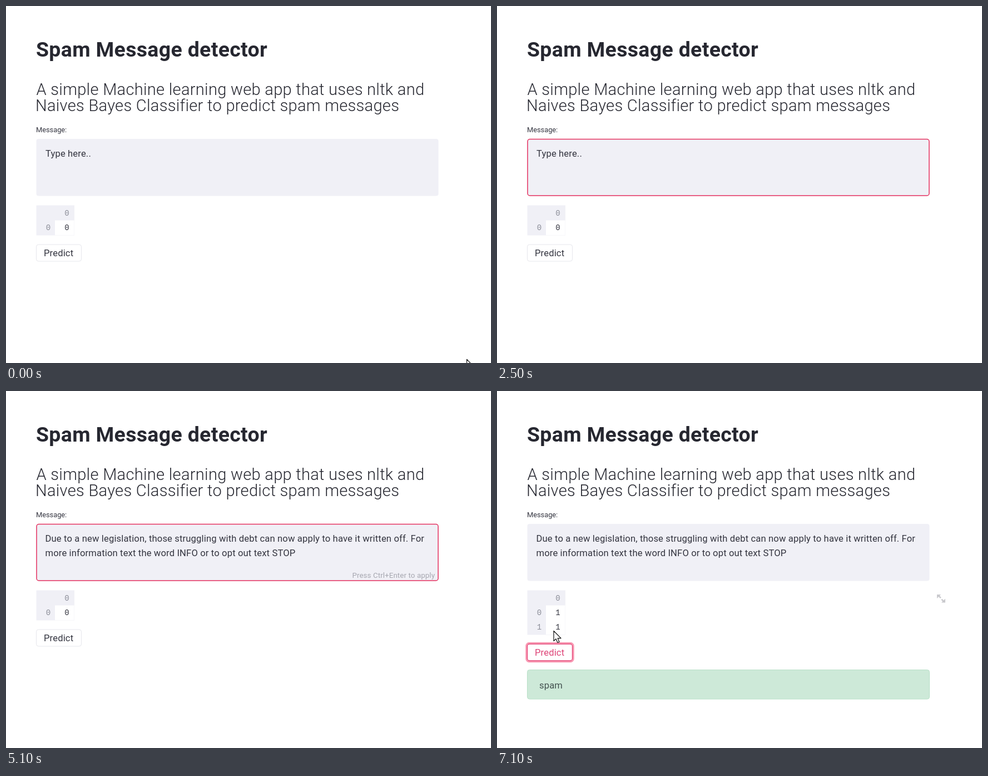
An HTML page for the animation above (7200 ms loop, 872x642 px).

```html
<!DOCTYPE html>
<html lang="en">
<head>
<meta charset="utf-8">
<title>Spam Message detector</title>
<style>
  html, body { margin: 0; width: 100%; height: 100%; overflow: hidden; background: #fff; }
  svg { display: block; width: 872px; height: 642px; }
  text { font: 16.57px Roboto, sans-serif; letter-spacing: .0093em; fill: #33343f; white-space: pre; }
  .title { font-size: 37.4px; font-weight: 700; fill: #262730; }
  .intro { font-size: 29px; font-weight: 300; letter-spacing: .011em; fill: #262730; }
  .label { font-size: 12.8px; letter-spacing: 0; }
  .hint { font-size: 13.26px; fill: #a6a7b0; }
  .cell { font: 14px "Liberation Mono", monospace; letter-spacing: 0; text-anchor: middle; }
  .index { fill: #8b8d98; }
  .panel { fill: #f0f0f6; }
  .cursor { fill: #fff; stroke: #111; stroke-width: 1.2; stroke-linejoin: round; }
</style>
</head>
<body>
<svg viewBox="0 0 872 642">
  <defs>
    <clipPath id="selected"><rect id="selectedArea" y="253" height="22"/></clipPath>
  </defs>

  <text class="title" x="54" y="91">Spam Message detector</text>
  <text class="intro" x="54.5" y="160">A simple Machine learning web app that uses nltk and</text>
  <text class="intro" x="53" y="189">Naives Bayes Classifier to predict spam messages</text>
  <text class="label" x="54" y="227">Message:</text>

  <rect class="panel" x="54.5" y="239" width="723" height="102.5" rx="4"/>
  <rect id="focus" x="55" y="239.5" width="722" height="101.5" rx="4" fill="none" stroke="#e5315f" stroke-width="1.5"/>
  <g id="placeholder">
    <text x="71" y="270.5">Type here..</text>
    <rect id="selection" y="253" height="22" fill="#2f8dfb"/>
    <text x="71" y="270.5" clip-path="url(#selected)" style="fill:#fff">Type here..</text>
    <path id="beam" d="M-4 272H-1L0 273L1 272H4M0 273V287" fill="none" stroke="#fff" stroke-width="1.5"/>
  </g>
  <path id="caret" d="M152.5 254V275" stroke="#262730"/>
  <g id="message">
    <text x="70.5" y="270.5">Due to a new legislation, those struggling with debt can now apply to have it written off. For</text>
    <text x="70.5" y="296.5">more information text the word INFO or to opt out text STOP</text>
  </g>
  <text id="hint" class="hint" x="622.5" y="336">Press Ctrl+Enter to apply</text>

  <rect id="tableBack" class="panel" x="54.5" y="358.5" width="68.5"/>
  <rect id="tableBody" x="88" y="385.5" width="34.5" fill="#fff"/>
  <text class="cell index" x="109.5" y="377">0</text>
  <text class="cell index" x="76" y="402.5">0</text>
  <text class="cell" id="firstValue" x="109.5" y="402.5"></text>
  <g id="secondRow">
    <text class="cell index" x="76" y="428.5">1</text>
    <text class="cell" x="109.5" y="428.5">1</text>
  </g>

  <g id="button">
    <rect id="ring" x="52.8" y="427.3" width="84.4" height="33.4" rx="5" fill="none" stroke="#f99ab3" stroke-width="3"/>
    <rect id="buttonEdge" x="54.5" y="429" width="81" height="30" rx="4" fill="#fff"/>
    <text id="buttonText" x="68" y="450">Predict</text>
  </g>

  <g id="result">
    <rect x="54.5" y="501.5" width="723" height="52.5" rx="4" fill="#cde9d8" stroke="#b8e0c8"/>
    <text x="76" y="534.5" style="fill:#43514f">spam</text>
  </g>
  <path id="expand" fill="#c9c9cd" d="M791 366H798L795.8 368.2L798.8 371.2L797 373L794 370L791 373Z
    M806 380.5H799L801.2 378.3L798.4 375.5L800.2 373.7L803 376.5L806 373.5Z"/>

  <path id="arrow" class="cursor" d="M0 0V18L4 14.3L7 21L10 19.7L7.2 13.2H13Z"/>
  <path id="hand" class="cursor" d="M-2 13V2A2 2 0 0 1 2 2V8.5Q4 7.6 6 9.3Q8 8.4 9.5 10.3Q11.3 10 11.3 12V17C11.3 20 9 21 9 24.5H0C0 21-3 19.5-4.5 16L-7 12.6C-8 10.6-5.6 9.5-4.2 11ZM2 8.5V13M6 9.3V13.5M9.5 10.3V14"/>
</svg>

<script>
const LOOP = 7200, STEP = 100;
const TEXT_END = 153;
const el = id => document.getElementById(id);
const show = (id, on) => { el(id).style.visibility = on ? "visible" : "hidden"; };
const set = (id, attrs) => { for (const k in attrs) el(id).setAttribute(k, attrs[k]); };
const between = (t, from, to = LOOP) => t >= from && t < to;

// Last row whose time has been reached.
const at = (table, t) => table.findLast(row => row[0] <= t).slice(1);

// time, opacity of the field outline
const FOCUS = [[0, 0], [1400, .5], [1500, 1], [5700, .5], [5800, .15], [5900, .06], [6000, 0]];

// time, left edge of the selection
const SELECTION = [[0, TEXT_END], [2900, 148], [3000, 135], [3100, 120], [3200, 97], [3400, 88], [3600, 71]];

// time, shape, x, y
const POINTER = [
  [0, "arrow", 828.5, 635.5], [100, "arrow", 770, 560], [200, "arrow", 600, 430], [300, ""],
  [5200, "arrow", 150, 470], [5300, "arrow", 168, 604], [5400, "arrow", 150, 540],
  [5500, "arrow", 126, 472], [5600, "hand", 113, 443], [5700, "hand", 111, 441],
  [6200, "arrow", 105, 443], [6400, "arrow", 104, 439], [6500, "arrow", 103, 436.5],
  [6700, "arrow", 102.5, 433], [6900, "arrow", 102, 431.5]
];

function drawField(t) {
  const pasted = t >= 3900;
  const [left] = at(SELECTION, t);
  const span = { x: left, width: TEXT_END - left };
  set("focus", { opacity: at(FOCUS, t)[0] });
  set("selection", span);
  set("selectedArea", span);
  set("beam", { transform: `translate(${left + 8})` });
  show("placeholder", !pasted);
  show("beam", between(t, 2900, 3900));
  show("caret", between(t, 1500, 2100));
  show("message", pasted);
  show("hint", between(t, 3900, 5700));
}

function drawTable(t) {
  const grown = t >= 6200, extra = grown ? 26 : 0;
  set("tableBack", { height: 54 + extra });
  set("tableBody", { height: 26.5 + extra });
  el("firstValue").textContent = grown ? "1" : "0";
  show("secondRow", grown);
  set("button", { transform: `translate(0 ${extra})` });
}

function drawButton(t) {
  const hot = t >= 5600;
  show("ring", t >= 5700);
  set("buttonEdge", { stroke: hot ? "#e5487a" : "#e6e7ec", "stroke-width": hot ? 1.4 : 1 });
  el("buttonText").style.fill = hot ? "#de4477" : "";
}

function drawPointer(t) {
  const [shape, x, y] = at(POINTER, t);
  for (const id of ["arrow", "hand"]) show(id, id === shape);
  if (shape) set(shape, { transform: `translate(${x} ${y})` });
}

function frame() {
  const t = Math.floor(performance.now() % LOOP / STEP) * STEP;
  drawField(t);
  drawTable(t);
  drawButton(t);
  show("result", t >= 6600);
  show("expand", t >= 6400);
  drawPointer(t);
  requestAnimationFrame(frame);
}
frame();
</script>
</body>
</html>
```
